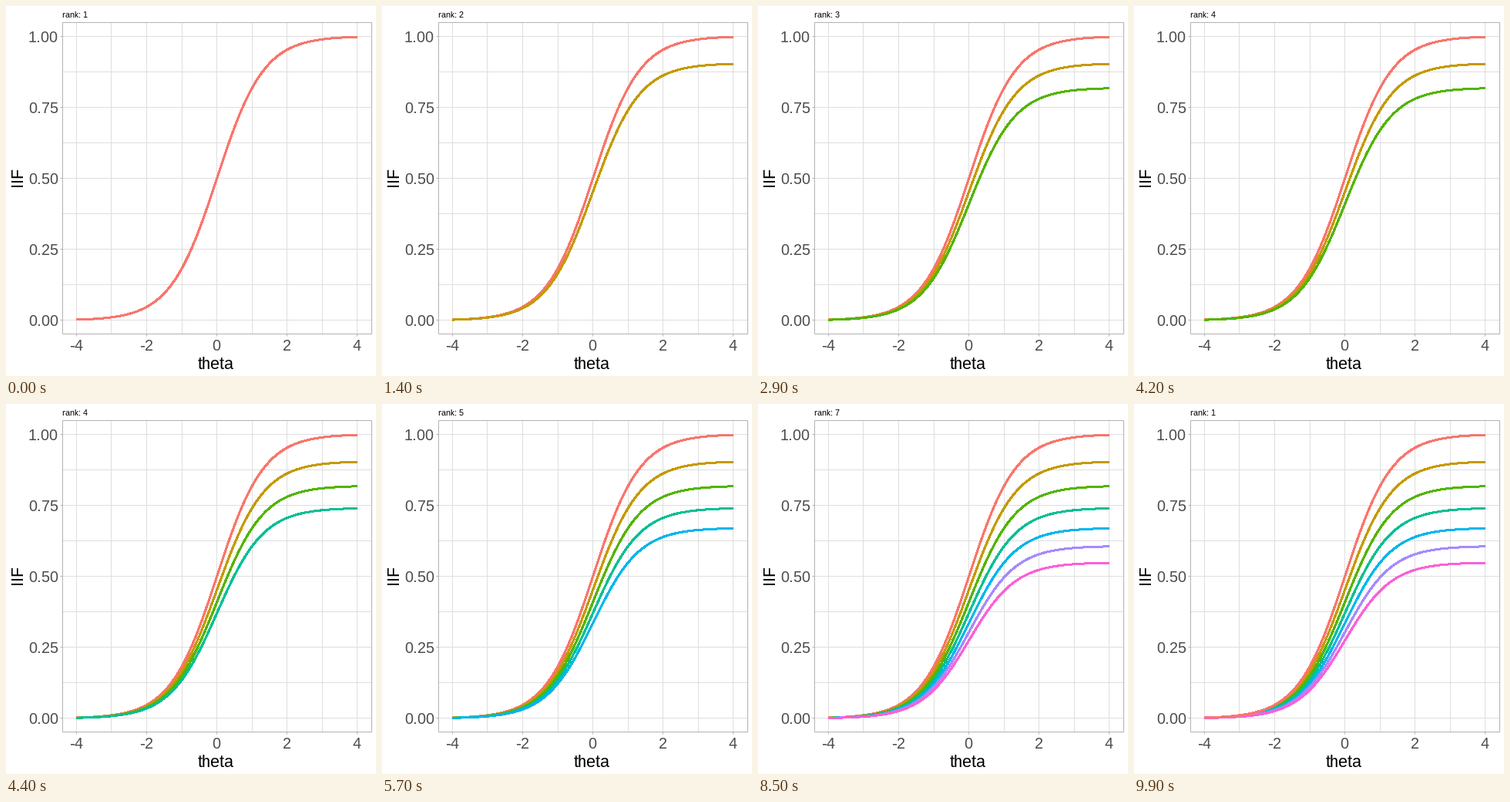
Animation, 480 px wide and 480 px high, one loop 10 s. Source, as a matplotlib script:

```python
import numpy as np
import matplotlib.pyplot as plt
from matplotlib.animation import FuncAnimation
from matplotlib.patches import Rectangle

plt.rcParams.update({
    "font.family": "Liberation Sans",
    "text.hinting": "native",
    "text.hinting_factor": 1,
    "path.simplify": False,
})

SIZE, STEP, LOOP = 480, 100, 10000
LEFT, RIGHT, TOP, BOTTOM = 73, 474, 21, 425
GRID, BORDER, LABEL = "#DEDEDE", "#B3B3B3", "#4D4D4D"
COLORS = ["#F8766D", "#C49A00", "#53B400", "#00C094",
          "#00B6EB", "#A58AFF", "#FB61D7"]
# Each title switches 200 ms before its curve appears; the last restarts at rank 1.
TITLE_TIMES = [1200, 2700, 4200, 5500, 6900, 8300, 9700]
CURVE_DELAY = 200


def px(theta):
    return 273.6 + 45.57 * theta


def py(value):
    return 407.9 - 368.7 * value


fig = plt.figure(figsize=(SIZE / 72, SIZE / 72), dpi=72, facecolor="white")
ax = fig.add_axes([0, 0, 1, 1])
ax.set_xlim(0, SIZE)
ax.set_ylim(SIZE, 0)
ax.axis("off")


def segment(x, y, color, z):
    # Whole coordinates snap to the centre of the pixel they name.
    ax.plot(x, y, color=color, lw=1, zorder=z, solid_capstyle="butt", snap=True)


def label(x, y, text, size, color="black", ha="center", **kw):
    return ax.text(x, y, text, fontsize=size, color=color, ha=ha,
                   va="baseline", **kw)


for theta in range(-4, 5):
    x = np.floor(px(theta))
    segment([x, x], [TOP, BOTTOM], GRID, 1)
    if theta % 2 == 0:
        segment([x, x], [BOTTOM, BOTTOM + 3], BORDER, 20)
        label(x, 447, str(theta), 20, LABEL)

for k in range(9):
    value = k / 8
    y = np.floor(py(value))
    segment([LEFT, RIGHT], [y, y], GRID, 1)
    if k % 2 == 0:
        segment([LEFT - 3, LEFT], [y, y], BORDER, 20)
        label(68, y + 8, f"{value:.2f}", 20, LABEL, ha="right")

ax.add_patch(Rectangle((LEFT, TOP), RIGHT - LEFT, BOTTOM - TOP,
                       fill=False, ec=BORDER, lw=1, zorder=20, snap=True))
label(272.5, 471, "theta", 22)
label(21, 221, "IIF", 22, rotation=90, rotation_mode="anchor")
title = label(73, 15, "rank: 1", 11, ha="left")

thetas = np.linspace(-4, 4, 81)
logistic = 1 / (1 + np.exp(-1.5 * thetas))
# Without antialiasing every touched pixel is filled, so width 2 shows as 3 px.
curves = [ax.plot(px(thetas), py(np.exp(-0.1 * i) * logistic), color=color,
                  lw=2, antialiased=False, solid_capstyle="butt",
                  solid_joinstyle="round", zorder=2 + i)[0]
          for i, color in enumerate(COLORS)]


def update(frame):
    t = frame * STEP
    rank = sum(t >= start for start in TITLE_TIMES) % len(COLORS)
    title.set_text(f"rank: {rank + 1}")
    drawn = sum(t >= start + CURVE_DELAY for start in TITLE_TIMES)
    for i, curve in enumerate(curves):
        curve.set_visible(i <= drawn)
    # Once every curve is shown, the first one is redrawn on top.
    curves[0].set_zorder(10 if drawn == len(COLORS) else 2)
    return [title, *curves]


anim = FuncAnimation(fig, update, frames=LOOP // STEP, interval=STEP,
                     repeat=True, repeat_delay=0, blit=False)
plt.show()
```
